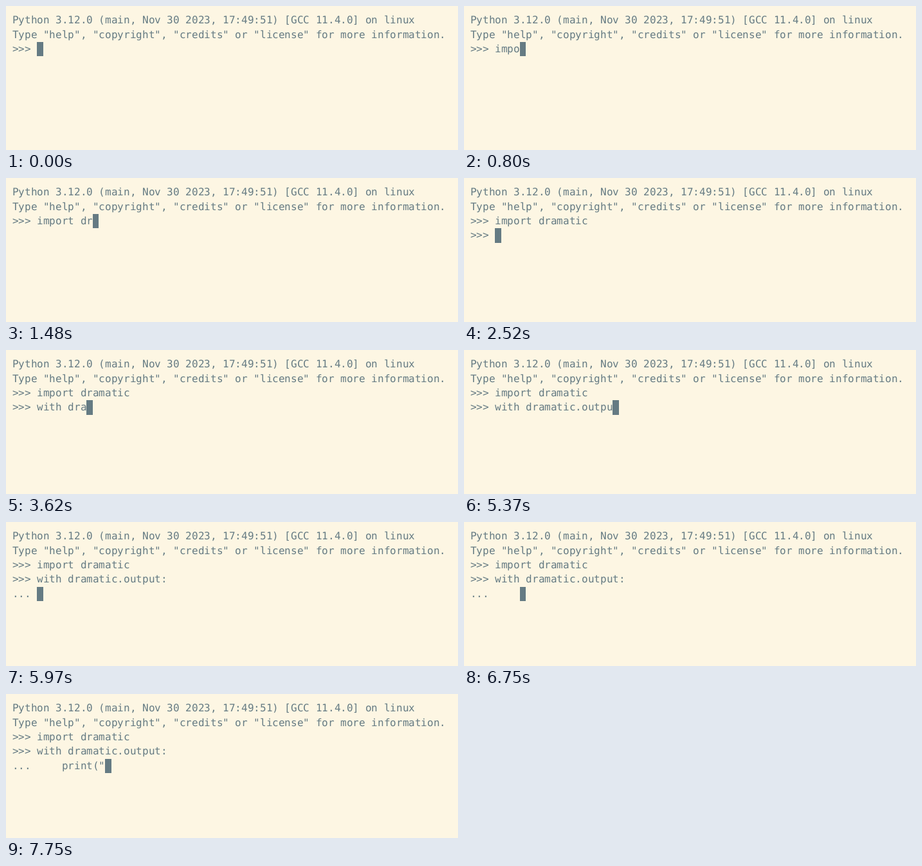
Animation, 703 px wide and 224 px high, one loop 8000 ms. Source, as an HTML page:

```html
<!DOCTYPE html>
<html lang="en">
<head>
<meta charset="utf-8">
<title>Python session</title>
<style>
  html, body { margin: 0; width: 100%; height: 100%; overflow: hidden; background: #fdf6e3; }
  svg { display: block; }
  text {
    font: 16px "DejaVu Sans Mono", monospace;
    font-variant-ligatures: none;
    text-rendering: geometricPrecision;
    white-space: pre;
    fill: #657b83;
  }
</style>
</head>
<body>
<svg id="term" width="703" height="224" viewBox="0 0 703 224">
  <rect width="703" height="224" fill="#fdf6e3"/>
  <rect id="cursor" fill="#657b83" shape-rendering="crispEdges"/>
</svg>
<script>
const LOOP = 8000, SIZE = 16, COL = 9.633, ROW = 22.4;
const HEAD = 'Python 3.12.0 (main, Nov 30 2023, 17:49:51) [GCC 11.4.0] on linux\n' +
  'Type "help", "copyright", "credits" or "license" for more information.\n>>> ';

// Bursts of typing: first key time, last key time, keys pressed
const BURSTS = [
  [530, 840, [...'impor']],
  [1000, 1100, ['t', ' ']],
  [1320, 1320, ['d']],
  [1480, 1480, ['r']],
  [1590, 2050, [...'amatic']],
  [2520, 2520, ['\n>>> ']],
  [2990, 3290, [...'with ']],
  [3430, 3620, [...'dra']],
  [3720, 4050, [...'matic']],
  [4400, 4400, ['.']],
  [4590, 4750, [...'out']],
  [4890, 4890, ['p']],
  [5370, 5500, [...'ut']],
  [5740, 5740, [':']],
  [5970, 5970, ['\n... ']],
  [6270, 6270, [' ']],
  [6450, 6750, [...'   ']],
  [7000, 7270, ['p', 'r', 'in', 't']],
  [7470, 7470, ['(']],
  [7750, 7750, ['"']]
];

const keys = BURSTS.flatMap(([from, to, list]) => list.map((key, i) => ({
  at: Math.round(from + (to - from) * i / Math.max(1, list.length - 1)), key
})));

const svg = document.getElementById('term');
const cursor = document.getElementById('cursor');
const colLeft = col => Math.round((col + 1) * COL);
const rowTop = row => Math.round((row + 0.5) * ROW);
const baseline = row => Math.round((row + 0.5) * ROW + SIZE);

const rows = Array.from({ length: 5 }, (_, row) => {
  const el = document.createElementNS('http://www.w3.org/2000/svg', 'text');
  el.setAttribute('y', baseline(row));
  return svg.appendChild(el);
});

let shown = '';

function draw(time) {
  const typed = keys.filter(k => k.at <= time).map(k => k.key).join('');
  const screen = HEAD + typed;
  if (screen === shown) return;
  shown = screen;

  const lines = screen.split('\n');
  rows.forEach((el, row) => {
    const line = lines[row] || '';
    if (el.textContent === line) return;
    el.textContent = line;
    // Each glyph sits on a whole pixel of the terminal grid
    el.setAttribute('x', [...line].map((_, col) => colLeft(col)).join(' '));
  });

  const row = lines.length - 1, col = lines[row].length;
  cursor.setAttribute('x', colLeft(col));
  cursor.setAttribute('y', rowTop(row));
  cursor.setAttribute('width', colLeft(col + 1) - colLeft(col));
  cursor.setAttribute('height', rowTop(row + 1) - rowTop(row));
}

function tick() {
  draw(performance.now() % LOOP);
  requestAnimationFrame(tick);
}
tick();
</script>
</body>
</html>
```
